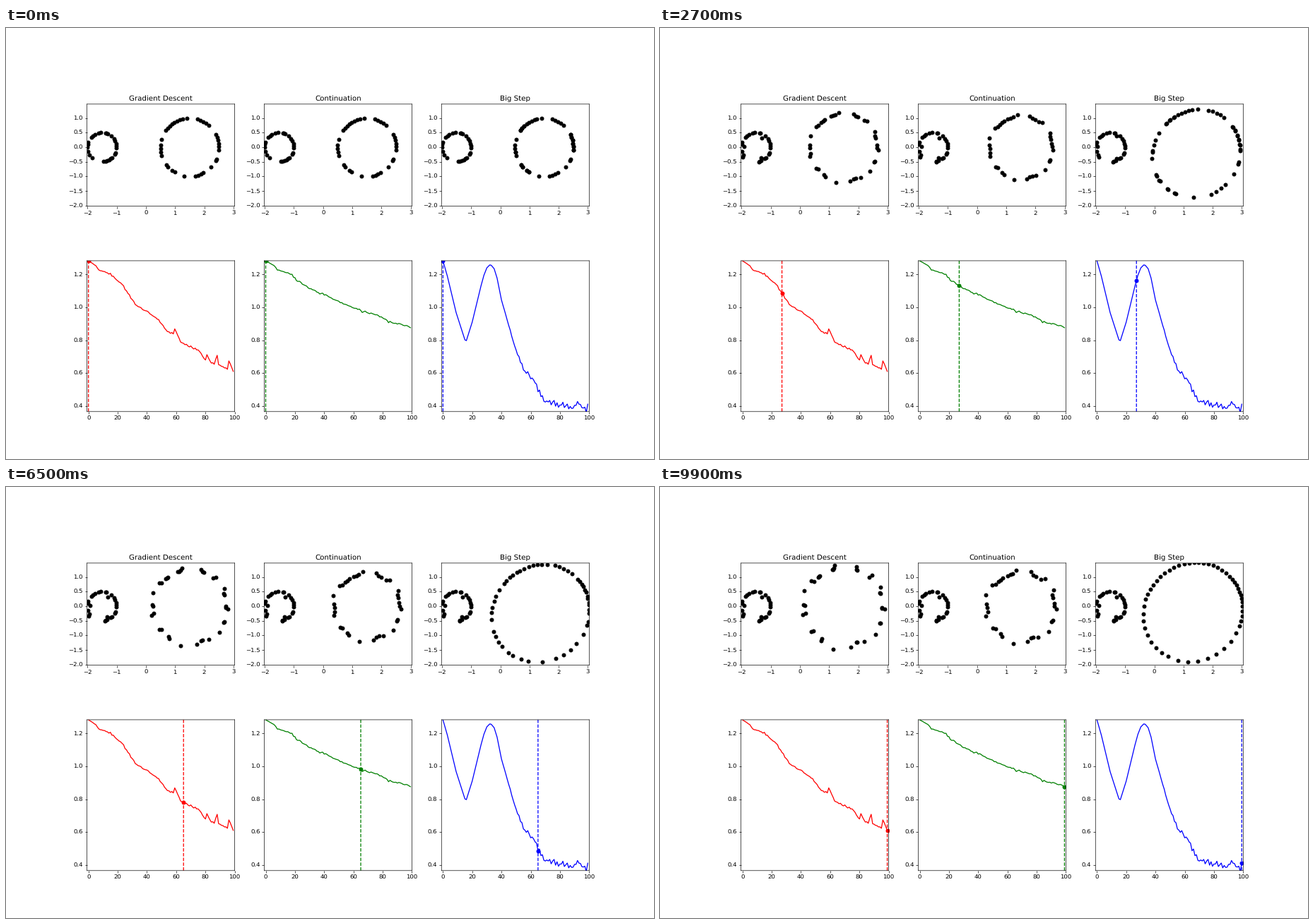
A matplotlib script that plays this animation: 917 by 611 pixels, repeating every 10000 ms.

```python
import matplotlib.pyplot as plt
import numpy as np
from matplotlib.animation import FuncAnimation

W, H, DPI = 917, 611, 61.13
FRAMES = 100
LAST = FRAMES - 1

plt.rcParams["text.hinting"] = "none"
rng = np.random.default_rng(4)


def runs(*spans):
    """Evenly spaced angles in radians from (start, stop, count) in degrees."""
    return np.radians(np.concatenate([np.linspace(*s) for s in spans]))


def polar(center, r, a):
    return np.column_stack([center[0] + r * np.cos(a),
                            center[1] + r * np.sin(a)])


def ramp(t, start, stop, power=1):
    return np.clip((t - start) / (stop - start), 0, 1) ** power


def loss_curve(keys, jitter, start=0):
    """Trend through key points, with noise that fades in after start."""
    t = np.arange(FRAMES)
    noise = rng.normal(0, jitter, FRAMES) * ramp(t, start, start + 20)
    return np.interp(t, *np.array(keys).T) + noise


# Samples on the large circle; some coincide until the big steps part them.
BIG = (1.5, 0)
big = runs((-27, -24, 2), (-5, 26, 6), (49, 74.5, 5), (95, 95, 1),
           (104, 144.5, 8), (164, 164, 1), (176.5, 197, 4), (218, 222, 2),
           (233, 239, 2), (259, 259, 1), (281, 298, 4), (317, 317, 1))
dense = np.sort(np.append(big, big[np.r_[2:8, 19:22, 25, 27:31]]))
around = np.concatenate([[big[-1] - 2 * np.pi], big, [big[0] + 2 * np.pi]])
gap = np.degrees(around[2:] - around[:-2]) / 2

# Directions in which neighbouring samples bunch up.
hubs = np.radians([-25, -4, 20, 28, 47, 71, 85, 104.5, 130, 141, 157, 178,
                   191, 218, 237, 256, 280, 290, 301, 319])
nearest = hubs[np.abs(big[:, None] - hubs).argmin(axis=1)]

SMALL = (-1.5, 0)
small = runs((-84, -70, 3), (-60, -46, 3), (-29, -22, 2), (-4, 15, 3),
             (27, 36, 2), (50, 50, 1), (67, 76, 3), (95, 105, 2),
             (120, 138, 3), (160, 180, 3), (197, 228, 3))
small_start = polar(SMALL, .5, small)
small_end = small_start.copy()
for deg, spot in [(-84, (-1.39, -.52)), (-60, (-1.33, -.36)),
                  (67, (-1.30, .32)), (180, (-1.90, .02)),
                  (228, (-1.96, -.33))]:
    small_end[np.abs(small - np.radians(deg)).argmin()] = spot


def push(base, slope, pull, power):
    """Lonely samples move out furthest, and all lean towards their hub."""
    reach = base + slope * gap

    def ring(t):
        u = ramp(t, 0, LAST, power)
        return polar(BIG, 1 + (reach - 1) * u,
                     big + pull * u * (nearest - big))
    return ring


# The big steps blow the ring up about a shifted center, then even it out.
HULL = (1.32, -.2)
dx, dy = (polar(BIG, 1, dense) - HULL).T
hull_r, hull_a = np.hypot(dx, dy), np.unwrap(np.arctan2(dy, dx))
even_a = np.radians(np.interp(np.arange(len(dense)),
                              [0, 4, 13, 23, 33, 42, 50],
                              [-17, 7, 44, 100, 165, 241, 334]))


def inflate(t):
    a = hull_a + (even_a - hull_a) * ramp(t, 17, LAST, .7)
    dent = .13 * (1 - ramp(t, 37, LAST))
    hull = (1.7 - .4 * dent + dent * np.cos(a + np.radians(40))
            + .06 * np.sin(2 * a))
    return polar(HULL, hull_r + (hull - hull_r) * ramp(t, 0, 37, .75), a)


descent_loss = loss_curve(
    [(0, 1.283), (5, 1.254), (7, 1.228), (15, 1.202), (23, 1.14),
     (33, 1.008), (40, .975), (46, .938), (50, .9), (54, .852), (58, .839),
     (59, .868), (63, .788), (76, .733), (80, .682), (81, .712), (83, .668),
     (86, .655), (88, .712), (89, .655), (95, .622), (96, .673), (99, .61)],
    .003)
contin_loss = loss_curve(
    [(0, 1.283), (6, 1.252), (8, 1.228), (18, 1.2), (21, 1.163), (30, 1.113),
     (39, 1.082), (51, 1.03), (65, .98), (78, .945), (86, .905), (92, .9),
     (99, .876)], .003)
step_loss = loss_curve(
    [(0, 1.283), (3, 1.19), (9, .968), (15, .802), (16, .797), (20, .91),
     (26, 1.13), (28, 1.195), (30, 1.24), (32, 1.258), (33, 1.256),
     (35, 1.235), (37, 1.178), (40, 1.045), (47, .825), (51, .705),
     (56, .605), (64, .535), (66, .46), (72, .425), (80, .4), (99, .388)],
    .013, 40)

# title, colour, loss, large ring, start and stop of the small ring's change
PANELS = [
    ("Gradient Descent", "r", descent_loss, push(1.24, .013, .8, .6), 0, 25),
    ("Continuation", "g", contin_loss, push(1.07, .012, .2, .63), 0, 28),
    ("Big Step", "b", step_loss, inflate, 17, 34),
]

fig, axes = plt.subplots(2, 3, figsize=((W + 1e-6) / DPI, (H + 1e-6) / DPI),
                         dpi=DPI)
for ax in axes.flat:
    for spine in ax.spines.values():
        spine.set_snap(False)

artists = []
for (top, low), (title, color, loss, *_) in zip(axes.T, PANELS):
    top.set(title=title, xlim=(-2.014, 3.044), ylim=(-2.025, 1.478),
            aspect="equal")
    dots, = top.plot([], [], "ko")
    low.set(xlim=(-1, 100), ylim=(.365, 1.2835))
    low.plot(loss, color)
    rule = low.axvline(0, color=color, ls="--", snap=False)
    mark, = low.plot([], [], color + "o")
    artists.append((dots, rule, mark))


def draw(t):
    for (dots, rule, mark), panel in zip(artists, PANELS):
        _, _, loss, ring, start, stop = panel
        inner = small_start + (small_end - small_start) * ramp(t, start, stop)
        dots.set_data(*np.vstack([inner, ring(t)]).T)
        rule.set_xdata([t, t])
        mark.set_data([t], [loss[t]])
    return [a for group in artists for a in group]


anim = FuncAnimation(fig, draw, frames=FRAMES, interval=100, repeat=True,
                     repeat_delay=0, blit=False)
plt.show()
```
